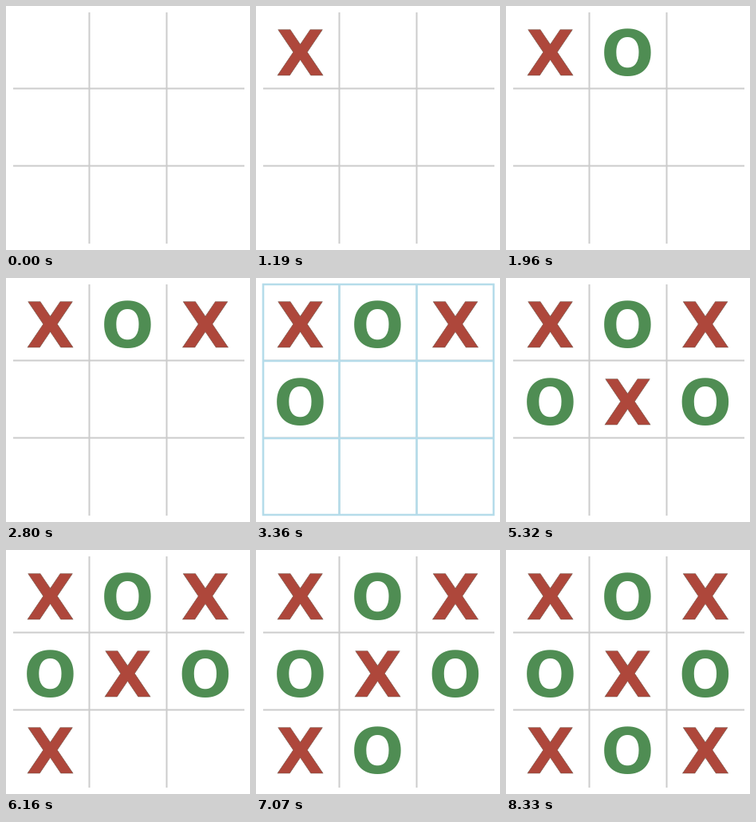
Write an HTML page that moves like this. It is 306 by 306 pixels and loops after 8400 ms.

```html
<!DOCTYPE html>
<html lang="en">
<head>
<meta charset="utf-8">
<title>Tic-tac-toe</title>
<style>
  html, body { margin: 0; width: 100%; height: 100%; overflow: hidden; background: #fff; }
  svg { display: block; width: 100%; height: 100%; }
  text { font: bold 78px "DejaVu Sans", Verdana, sans-serif; text-anchor: middle; opacity: 0; }
  .x { fill: #ae473b; stroke: #75584c; stroke-width: .5; }
  .o { fill: #4f8d53; }
  #grid { stroke: #ccc; stroke-width: 2; }
  #glow { fill: none; stroke: #b5dcea; stroke-width: 2.6; opacity: 0; }
</style>
</head>
<body>
<svg viewBox="0 0 306 306">
  <path id="grid" d="M104.5 8V298M201.5 8V298M9 103.5H299M9 200.5H299"/>
  <path id="glow" d="M9 8H298V297H9ZM104.5 8V297M201.5 8V297M9 104H298M9 201H298"/>
  <g id="marks"></g>
</svg>
<script>
  const LOOP = 8400, TURN = 840;
  const COLS = [55.5, 152.5, 250], ROWS = [87, 183.5, 280];
  // How long the board stays lit after each move
  const LIT = [280, 210, 280, 280, 280, 280, 280, 280, 210];

  const marks = document.getElementById("marks");

  // steps: [time, opacity] pairs, each held until the next
  function play(el, steps) {
    const frames = [[0, 0], ...steps, [LOOP, 0]].map(([t, opacity]) =>
      ({ offset: t / LOOP, opacity, easing: "steps(1, end)" }));
    el.animate(frames, { duration: LOOP, iterations: Infinity });
  }

  function addMark(i) {
    const el = document.createElementNS("http://www.w3.org/2000/svg", "text");
    const isX = i % 2 === 0;
    el.setAttribute("class", isX ? "x" : "o");
    el.setAttribute("x", COLS[i % 3]);
    el.setAttribute("y", ROWS[Math.floor(i / 3)]);
    el.textContent = isX ? "X" : "O";
    marks.append(el);
    play(el, [[(i + 1) * TURN, 1]]);
  }

  LIT.forEach((_, i) => addMark(i));
  play(document.getElementById("glow"), LIT.flatMap((ms, i) => {
    const t = (i + 1) * TURN;
    return [[t, 1], [t + ms, 0]];
  }));
</script>
</body>
</html>
```
